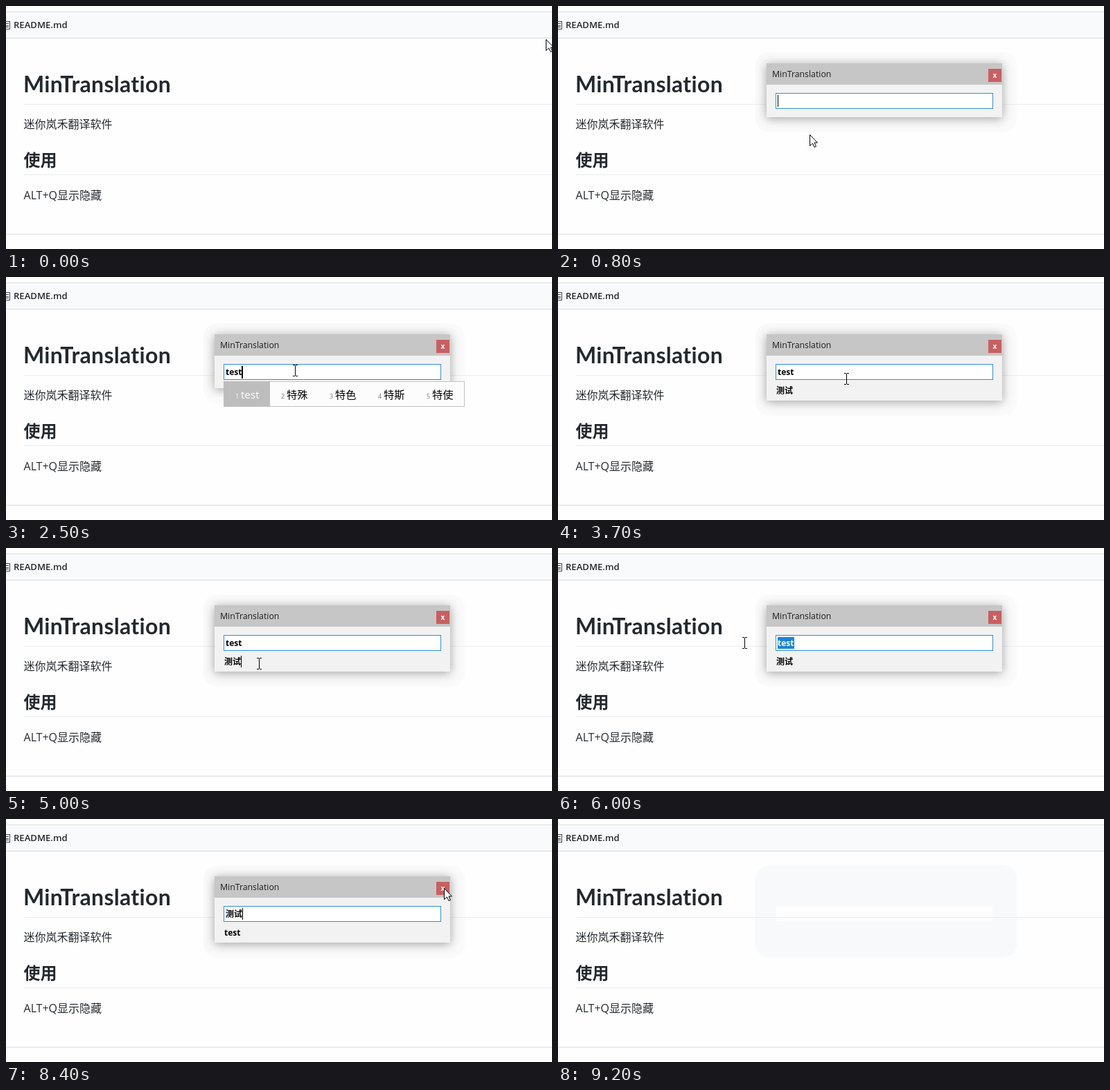
Write an HTML page with a canvas that moves like this. It is 788 px wide and 352 px high and loops after 9300 ms.

```html
<!DOCTYPE html>
<html lang="zh-CN">
<head>
<meta charset="utf-8">
<title>MinTranslation</title>
<style>
  html, body { margin: 0; width: 100%; height: 100%; overflow: hidden; background: #fefefe; }
  canvas { display: block; }
</style>
</head>
<body>
<canvas id="stage" width="788" height="352"></canvas>
<script>
const ctx = document.getElementById('stage').getContext('2d', { alpha: false });
const LOOP = 9300, STEP = 100;
const SANS = '"Open Sans", "Noto Sans CJK SC", "Noto Sans CJK", sans-serif';
const INK = '#24292e';
const WIN = { x: 301, y: 83, w: 340, shown: 700, hidden: 8700 };
const GROW = 3400, SELECT = 5200, PASTE = 6200, RESULT = 7000;

// Pointer path: time, x, y, shape used from that time on
const path = [
  [0, 779, 48, 'arrow'], [500, 342, 204, 'arrow'], [700, 350, 197, 'arrow'],
  [1000, 390, 163, 'arrow'], [1100, 390, 163, 'arrow'], [1300, 407, 146, 'beam'],
  [1600, 410, 137, 'beam'], [1700, 410, 137, 'beam'], [1900, 417, 135, 'beam'],
  [3600, 417, 135, 'beam'], [3800, 414, 158, 'beam'], [4000, 414, 158, 'beam'],
  [4300, 400, 172, 'arrow'], [4400, 395, 174, 'arrow'], [4500, 395, 174, 'arrow'],
  [4700, 375, 168, 'beam'], [5000, 365, 167, 'beam'], [5200, 345, 138, 'beam'],
  [5500, 278, 137, 'beam'], [6000, 269, 137, 'beam'], [6100, 262, 137, 'arrow'],
  [7300, 262, 137, 'arrow'], [7700, 499, 154, 'arrow'], [8300, 644, 91, 'arrow'],
  [8700, 597, 127, 'arrow'], [9000, 731, 75, 'arrow'], [9100, 780, 48, 'arrow'],
  [9200, 800, 40, 'none'], [9300, 800, 40, 'none']
];

// Times at which the input caret is visible
const caretOn = [[700, 1800], [2600, 2900], [3800, 4300], [6200, 6300], [6400, 6900], [7400, 7900], [8400, 8700]];

// Input method states: time, typed letters, further candidates
const typing = [
  [2100, 't', ['他', '她', '天', '听']],
  [2200, 'te', ['特', '忑', '忒', '铽']],
  [2400, 'tes', ['特殊', '特色', '特斯', '特使']],
  [2500, 'test', ['特殊', '特色', '特斯', '特使']]
];

const between = (t, from, to) => t >= from && t < to;

function rect(x, y, w, h, color) {
  ctx.fillStyle = color;
  ctx.fillRect(x, y, w, h);
}

function text(str, x, y, size, color = INK, weight = 400, family = SANS) {
  ctx.font = `${weight} ${size}px ${family}`;
  ctx.fillStyle = color;
  ctx.fillText(str, x, y);
  return ctx.measureText(str).width;
}

function panel(x, y, w, h, radius, color) {
  ctx.beginPath();
  ctx.roundRect(x, y, w, h, radius);
  ctx.fillStyle = color;
  ctx.fill();
}

function pointerAt(t) {
  const i = path.findLastIndex(k => k[0] <= t);
  const [t0, x0, y0, shape] = path[i];
  const [t1, x1, y1] = path[Math.min(i + 1, path.length - 1)];
  const p = t1 > t0 ? (t - t0) / (t1 - t0) : 0;
  return { x: Math.round(x0 + (x1 - x0) * p), y: Math.round(y0 + (y1 - y0) * p), shape };
}

function drawPage() {
  rect(0, 9, 788, 37, '#f8fafc');
  rect(0, 8, 788, 1, '#d9dcdf');
  rect(0, 46, 788, 1, '#d6dadd');
  ctx.strokeStyle = '#42474c';
  ctx.lineWidth = 1;
  ctx.strokeRect(-4.5, 22.5, 10, 11);
  for (const y of [25, 28, 30]) rect(0, y, 4, 1, '#42474c');
  text('README.md', 11, 32, 13.1, INK, 600);

  // Slight tracking also keeps "ti" from joining into a ligature
  ctx.letterSpacing = '0.3px';
  text('MinTranslation', 25, 125, 32, INK, 700, 'Lato, sans-serif');
  ctx.letterSpacing = '0px';
  rect(26, 142, 762, 1, '#eaecef');
  text('迷你岚禾翻译软件', 25.5, 177, 16);
  text('使用', 25.5, 232, 24, INK, 700);
  rect(26, 244, 762, 1, '#eaecef');
  text('ALT+Q显示隐藏', 25.5, 280, 16);
  rect(0, 330, 788, 1, '#dadcdf');
}

function drawLinkIcon() {
  ctx.strokeStyle = '#1b1f23';
  ctx.lineWidth = 1.4;
  for (const [x, y] of [[6.7, 108.7], [12.2, 111.2]]) {
    ctx.beginPath();
    ctx.roundRect(x, y, 8.5, 6, 3);
    ctx.stroke();
  }
}

function drawWindow(t, height, pointer) {
  const { x, y, w } = WIN;
  ctx.save();
  ctx.shadowColor = 'rgba(0,0,0,.36)';
  ctx.shadowBlur = 14;
  ctx.shadowOffsetY = 2;
  rect(x, y, w, height, '#f2f2f2');
  ctx.restore();
  rect(x, y, w, 31, '#c6c6c6');
  text('MinTranslation', 309, 103, 12.3, '#1c1c1c');
  rect(621, 91, 19, 19, '#c95f60');
  text('x', 627.5, 104, 10, '#fff', 700);

  rect(314, 126, 314, 23, '#2f8fd5');
  rect(315, 127, 312, 21, '#fff');

  const ime = t < 2600 ? typing.findLast(s => s[0] <= t) : null;
  const typed = t >= PASTE ? '测试' : t >= 2600 ? 'test' : ime ? ime[1] : '';
  const width = text(typed, 317, 142, 12, '#000', 700);
  if (between(t, SELECT, PASTE)) {
    const left = Math.max(317, Math.min(341, pointer.x));
    rect(left, 129, 341 - left, 17, '#1a84d8');
    ctx.save();
    ctx.beginPath();
    ctx.rect(left, 127, 30, 21);
    ctx.clip();
    text(typed, 317, 142, 12, '#fff', 700);
    ctx.restore();
  }
  const caretX = 317 + Math.round(width);
  if (ime) rect(caretX, 129, 2, 18, '#000');
  else if (caretOn.some(([from, to]) => between(t, from, to))) rect(caretX, 129, 1, 17, '#000');

  if (t >= GROW) text(t >= RESULT ? 'test' : '测试', 315, 169, 12, '#000', 700);
  if (between(t, 4800, SELECT)) rect(339, 156, 1, 17, '#000');
  if (ime) drawCandidates([ime[1], ...ime[2]]);
}

function drawCandidates(words) {
  ctx.font = `400 15.2px ${SANS}`;
  const cells = words.map(word => Math.round(ctx.measureText(word).width) + 40);
  const total = cells.reduce((a, b) => a + b, 2);
  rect(314, 151, total, 37, '#c3c3c3');
  rect(315, 152, total - 2, 35, '#fcfcfc');
  rect(314, 151, cells[0] + 1, 37, '#bdbdbd');
  let x = 315;
  words.forEach((word, i) => {
    text(i + 1, x + 16, 176, 9, i ? '#777' : '#fff');
    text(word, x + 24, 176, 15.2, i ? '#000' : '#fff');
    x += cells[i];
  });
}

function drawPointer({ x, y, shape }) {
  if (shape === 'beam') {
    rect(x, y - 7, 1, 15, '#000');
    for (const end of [y - 8, y + 8]) {
      rect(x - 3, end, 3, 1, '#000');
      rect(x + 1, end, 3, 1, '#000');
    }
  } else if (shape === 'arrow') {
    ctx.save();
    ctx.translate(x + .5, y + .5);
    const outline = new Path2D('M0 0V16L4 12.5L6.5 18L9 17L6.5 11.5H11Z');
    ctx.fillStyle = '#fff';
    ctx.fill(outline);
    ctx.strokeStyle = '#000';
    ctx.lineWidth = 1;
    ctx.stroke(outline);
    ctx.restore();
  }
}

function draw(t) {
  const pointer = pointerAt(t);
  const open = between(t, WIN.shown, WIN.hidden);
  const height = t >= GROW ? 96 : 78;
  rect(0, 0, 788, 352, '#fefefe');

  // Wide halo around the window, which lingers after closing
  if (t >= WIN.shown) {
    panel(284.5, 67, 378, height + 38, 21, open ? '#fafafb' : '#f8f9fb');
    if (!open) rect(315, 127, 312, 21, '#fefefe');
  }
  drawPage();

  const overWindow = open && between(pointer.x, 301, 641) && between(pointer.y, 83, 83 + height);
  if (pointer.shape === 'arrow' && between(pointer.y, 95, 143) && !overWindow) drawLinkIcon();
  if (open) drawWindow(t, height, pointer);
  drawPointer(pointer);
}

function frame() {
  const t = performance.now() % LOOP;
  draw(Math.floor(t / STEP) * STEP);
  requestAnimationFrame(frame);
}
frame();
</script>
</body>
</html>
```
